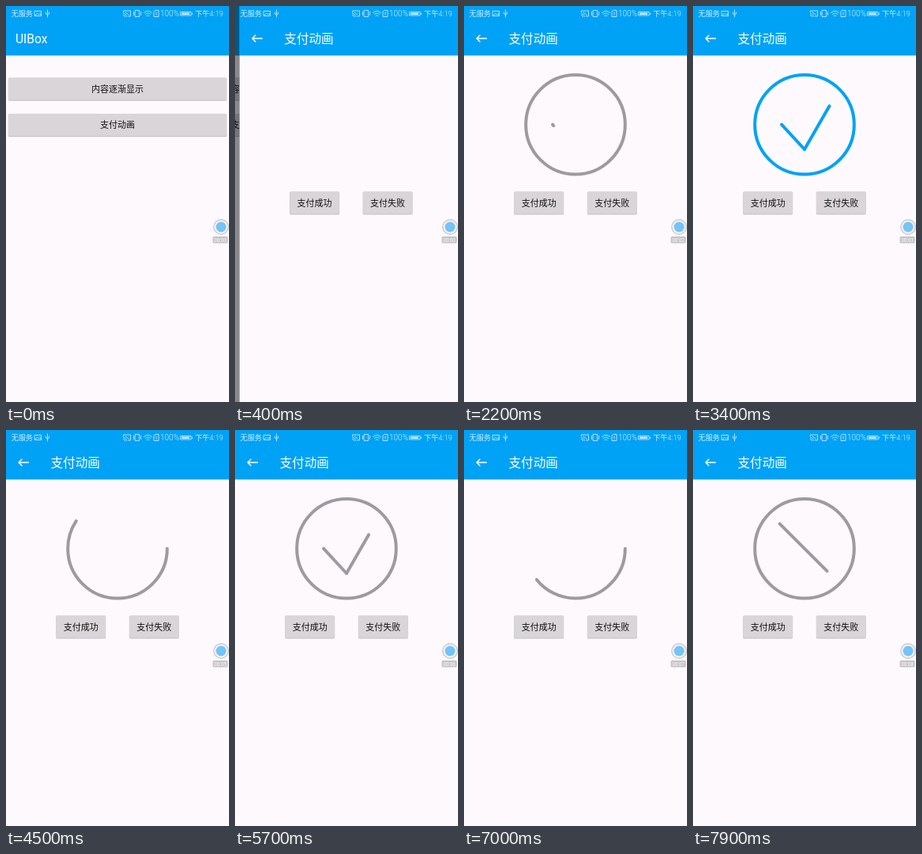
Recreate the animation shown at these times as an HTML page. Size 282x500 px, loop 8000 ms.

```html
<!DOCTYPE html>
<html lang="zh-CN">
<head>
<meta charset="utf-8">
<style>
html, body { margin: 0; width: 100%; height: 100%; overflow: hidden; background: #fdf9fd; }
svg { display: block; width: 100vw; height: 100vh; }
text { font-family: Roboto, "Noto Sans CJK SC", "Noto Sans CJK", sans-serif; }
.title { font-size: 15.6px; fill: #fff; }
.label { font-size: 11px; font-weight: 500; fill: #111; text-anchor: middle; }
.status { font-size: 9.2px; font-weight: 300; fill: #d3eefd; }
.line { fill: none; stroke-linecap: round; stroke-linejoin: round; }
</style>
</head>
<body>
<svg viewBox="0 0 282 500">
  <g id="home">
    <rect width="282" height="500" fill="#fdf9fd"/>
    <rect width="282" height="62.5" fill="#00a2f5"/>
    <text class="title" x="12" y="47">UIBox</text>
  </g>
  <rect id="shade" width="282" height="500" opacity="0"/>
  <g id="pay">
    <rect width="282" height="500" fill="#fdf9fd"/>
    <rect width="282" height="62.5" fill="#00a2f5"/>
    <path class="line" d="M28.5 41H16M20 37l-4 4l4 4" stroke="#fff" stroke-width="1.4"/>
    <text class="title" x="56.5" y="47">支付动画</text>
    <g id="mark" class="line" stroke-width="4">
      <path d="M203.8 149.7a62.8 62.8 0 0 1-125.6 0a62.8 62.8 0 0 1 125.6 0" pathLength="1"/>
      <path pathLength="1"/>
      <path pathLength="1"/>
    </g>
  </g>
  <g>
    <text class="status" x="6.5" y="13">无服务</text>
    <text class="status" x="195" y="13" style="font-size:10px">100%</text>
    <text class="status" x="239" y="13">下午4:19</text>
    <g class="line" stroke="#c4e8fc" stroke-width=".9">
      <path d="M36.5 6.5h8v6h-8zM37 12l2.5-3l2 2l1.500-1.500l1.500 2.500"/>
      <path d="M52.500 5v9M50.500 8v2l2 1.500l2-1.500v-2"/>
      <path d="M148.500 8v-2h9v7h-3M148.500 9.500a4 4 0 0 1 4 4M148.500 11.500a2 2 0 0 1 2 2M151 8l4 3"/>
      <path d="M163.500 5.500h5v8h-5zM161.500 7.500v4M170.500 7.500v4"/>
      <path d="M174.500 8.500q5-4.500 10 0M176.200 10.500q3.300-3 6.600 0M178 12.500q1.500-1.500 3 0"/>
      <path d="M189 5.500h4v8h-6v-6zM190 8v2.500M190 12v.1"/>
      <path d="M221 7.500h13v4.500h-13zM235.500 9v1.500"/>
    </g>
    <rect x="222" y="8.500" width="10" height="2.500" fill="#c4e8fc"/>
  </g>
  <circle cx="272" cy="279" r="9.300" fill="#f3f3f6" stroke="#cfcdd1" stroke-width="1.500"/>
  <circle cx="272" cy="279" r="6.500" fill="#74c4f6"/>
  <rect x="261.500" y="291" width="19" height="8.500" rx="1.500" fill="#c6c3c7"/>
  <text id="clock" x="271" y="297.500" font-size="6.300" fill="#fff" text-anchor="middle"></text>
</svg>
<script>
const LOOP = 8000, W = 282, CIRCLE = 900, STROKE = 450;
const $ = id => document.getElementById(id);
const clamp = v => Math.min(1, Math.max(0, v));
const ease = v => .5 - Math.cos(Math.PI * clamp(v)) / 2;

const check = ["M112 149.700L141 181", "M141 181L172.500 126.300"];
const cross = ["M109.600 118.300L172.400 181.100", "M172.400 118.300L109.600 181.100"];
const runs = [[1240, check], [3997, check], [6613, cross]];
const parts = [...$("mark").children];

function button(page, x, y, w, h, label) {
  $(page).insertAdjacentHTML("beforeend", `
    <rect x="${x - .5}" y="${y}" width="${w + 1}" height="${h + 1}" rx="2" fill="#000" opacity=".1"/>
    <rect x="${x}" y="${y + .5}" width="${w}" height="${h}" rx="1.500" fill="#000" opacity=".15"/>
    <rect x="${x}" y="${y}" width="${w}" height="${h - .3}" rx="1.500" fill="#d9d5d9"/>
    <text class="label" x="${x + w / 2}" y="${y + h / 2 + 4}">${label}</text>`);
}
button("home", 3, 90.5, 276, 28.5, "内容逐渐显示");
button("home", 3, 136, 276, 28.5, "支付动画");
button("pay", 63.500, 234.300, 62.500, 28.500, "支付成功");
button("pay", 156, 234.300, 62.500, 28.500, "支付失败");

function drawMark(t) {
  const run = runs.filter(r => t >= r[0]).pop();
  $("mark").style.display = run ? "" : "none";
  if (!run) return;
  const [start, lines] = run, age = t - start;
  const done = [age / CIRCLE, (age - CIRCLE) / STROKE, (age - CIRCLE - STROKE) / STROKE];
  parts.forEach((el, i) => {
    if (i) el.setAttribute("d", lines[i - 1]);
    const p = ease(done[i]);
    el.style.display = p > 0 ? "" : "none";
    el.setAttribute("stroke-dasharray", p < 1 ? `${p} 2` : "none");
  });
  $("mark").setAttribute("stroke", done[2] >= 1 ? "#00a2f5" : "#9f9a9f");
}

function draw(now) {
  const t = now % LOOP;
  const left = (1 - clamp((t - 60) / 470)) ** 3;
  $("pay").setAttribute("transform", `translate(${W * left})`);
  $("home").setAttribute("transform", `translate(${-127 * (1 - left)})`);
  $("shade").setAttribute("opacity", .47 * (1 - left));
  drawMark(t);
  $("clock").textContent = "00:0" + Math.floor(t / 900);
  requestAnimationFrame(draw);
}
draw(0);
</script>
</body>
</html>
```
